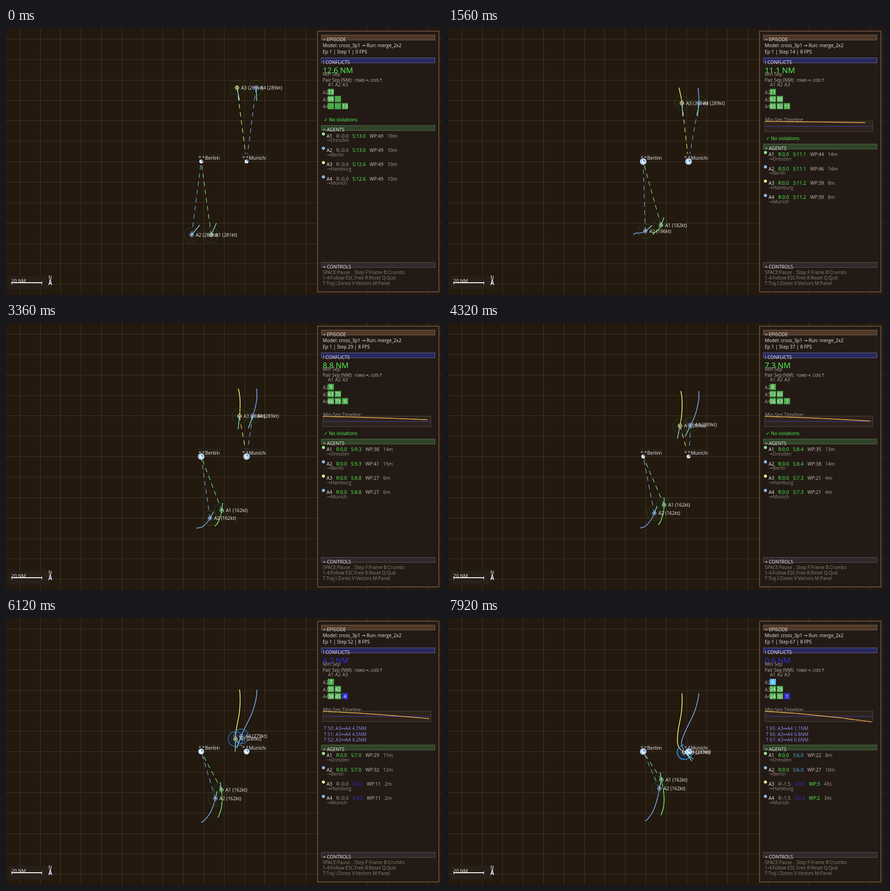
These frames come from a looping animation (956x586 px, 8 s). An HTML page:

```html
<!DOCTYPE html>
<html lang="en">
<head>
<meta charset="utf-8">
<title>Separation monitor</title>
<style>
html, body { margin: 0; width: 100%; height: 100%; overflow: hidden; background: #23190f; }
svg { display: block; width: 956px; height: 586px; font-family: "Open Sans", "Noto Sans", "DejaVu Sans", sans-serif; }
</style>
</head>
<body>
<svg viewBox="0 0 956 586"><g id="back"></g><g id="map"></g><g id="panel"></g></svg>
<script>
const LOOP = 8000, STEP = 120, NM = 3.32; // NM: pixels per nautical mile
const GREEN = '#50ff50', SKY = '#50beff', BLUE = '#3232dc', WHITE = '#ebebeb', GRAY = '#aaa299', DIM = '#8c847b', BOX = '#281f18';
const BERLIN = [428, 293], MUNICH = [527.5, 293];

// Steps at which the southern and northern pairs pass their waypoints.
const SOUTH = [1, 3, 8, 14, 29, 48, 67], NORTH = [1, 14, 29, 48, 58, 67, 72];
const slowTo = (floor, from, rate) => s => Math.max(floor, from - rate * (s - 1));
const slowAfter = (start, rate) => s => 289 - rate * Math.max(0, s - start);

const agents = [
  { name: 'A1', dest: 'Dresden', goal: BERLIN, color: '#78ff78', times: SOUTH, kt: slowTo(162, 281, 7.6),
    path: [[450, 454], [452, 449.8], [461, 443], [467, 433], [473, 411.5], [473, 383], [468, 355]] },
  { name: 'A2', dest: 'Berlin', goal: BERLIN, color: '#78b4ff', times: SOUTH, kt: slowTo(162, 282, 6.6),
    path: [[407, 454], [410, 450.7], [421.5, 449.8], [432.5, 446], [447.2, 428.3], [457.5, 402], [463.5, 374.5]] },
  { name: 'A3', dest: 'Hamburg', goal: MUNICH, color: '#ffff78', times: NORTH, kt: slowAfter(48, 2.2),
    path: [[506.6, 131], [512.9, 165], [512, 204.5], [503.7, 254.6], [504.8, 280.6], [518, 295], [531, 301]] },
  { name: 'A4', dest: 'Munich', goal: MUNICH, color: '#78b4ff', times: NORTH, kt: slowAfter(46, 1.6),
    path: [[548.4, 131], [550, 165], [541.1, 204], [520, 249.6], [512, 274.8], [519.5, 293.7], [531, 302]] }
];

// Cubic Hermite through unevenly timed waypoints.
function place({ path, times }, s) {
  const last = path.length - 1;
  let i = 0;
  while (i < last - 1 && s > times[i + 1]) i++;
  const h = times[i + 1] - times[i], u = (s - times[i]) / h;
  const slope = (k, c) => {
    const p = Math.max(0, k - 1), n = Math.min(last, k + 1);
    return (path[n][c] - path[p][c]) / (times[n] - times[p]);
  };
  return [0, 1].map(c =>
    path[i][c] * (1 + 2 * u) * (1 - u) ** 2 + slope(i, c) * h * u * (1 - u) ** 2 +
    path[i + 1][c] * u * u * (3 - 2 * u) + slope(i + 1, c) * h * u * u * (u - 1));
}
function heading(agent, s) {
  const p = place(agent, s), q = place(agent, s + 0.2);
  return Math.atan2(q[0] - p[0], p[1] - q[1]);
}
const miles = (p, q) => Math.hypot(p[0] - q[0], p[1] - q[1]) / NM;
const separation = (i, j, s) => miles(place(agents[i], s), place(agents[j], s));
const nearest = (i, s) => i < 2 ? separation(0, 1, s) : separation(2, 3, s);
const minSep = s => Math.min(nearest(0, s), nearest(2, s));
const level = (d, ok, near, bad) => d < 5 ? bad : d < 7 ? near : ok;

const text = (x, mid, str, fill = WHITE, size = 10.3, extra = '') =>
  `<text x="${x}" y="${mid + size * 0.36}" fill="${fill}" font-size="${size}" ${extra}>${str}</text>`;
const rect = (x, y, w, h, fill, stroke = 'none') =>
  `<rect x="${x}" y="${y}" width="${w}" height="${h}" fill="${fill}" stroke="${stroke}"/>`;
const line = (x1, y1, x2, y2, stroke, width = 1, extra = '') =>
  `<line x1="${x1}" y1="${y1}" x2="${x2}" y2="${y2}" stroke="${stroke}" stroke-width="${width}" ${extra}/>`;
const circle = (x, y, r, fill, stroke = 'none', width = 1) =>
  `<circle cx="${x}" cy="${y}" r="${r}" fill="${fill}" stroke="${stroke}" stroke-width="${width}"/>`;
const poly = (pts, stroke, width) =>
  `<polyline points="${pts.map(p => p.map(v => v.toFixed(2)).join()).join(' ')}" fill="none" stroke="${stroke}" stroke-width="${width}"/>`;
const header = (y, str, fill, stroke) =>
  rect(691.5, y + 0.5, 249, 11, fill, stroke) + text(695, y + 10, str);

function drawBack() {
  let out = rect(0, 0, 956, 586, '#23190f');
  for (let i = 0; i < 22; i++) {
    const x = Math.round(29.8 + i * 44.8) + 0.5, y = Math.round(24 + i * 44.85) + 0.5;
    out += line(x, 0, x, 586, '#40352a') + line(0, y, 956, y, '#40352a');
  }
  out += rect(6, 544, 90, 30, BOX) + text(12, 555, '20 NM');
  out += line(12, 559, 79, 559, '#fff', 2) + line(12.5, 556, 12.5, 563, '#fff') + line(78.5, 556, 78.5, 563, '#fff');
  out += text(93, 547.5, 'N');
  return out + '<path d="M97 551L100 563L97 560L94 563Z" fill="#5a6ec8" stroke="#fff" stroke-width="1.2"/>';
}

function drawAgent(agent, i, s) {
  const [x, y] = place(agent, s), turn = heading(agent, s), kt = agent.kt(s);
  const close = nearest(i, s) < 5;
  const trail = [];
  for (let k = s <= 20 ? 1 : Math.round(0.2 * s + 0.3); k <= s; k++) trail.push(place(agent, k));
  return line(x, y, ...agent.goal, agent.color, 1.2, 'stroke-dasharray="10 8"') +
    poly(trail, agent.color, 1.6) +
    circle(x, y, 16, 'none', close ? '#2882c8' : '#24501c', close ? 1.4 : 1) +
    circle(x, y, 9, 'none', close ? '#2c3cae' : '#343029') +
    circle(x, y, 4, '#30302c', agent.color, 1.3) +
    line(x - 3, y, x + 3, y, '#fff') + line(x, y - 3, x, y + 3, '#fff') +
    line(x, y, x + Math.sin(turn) * kt * 0.1, y - Math.cos(turn) * kt * 0.1, '#96ffff', 1.3) +
    text(x + 9, y, `${agent.name} (${Math.round(kt)}kt)`);
}

function drawCity([x, y], left, width, name, ghost, s) {
  const pulse = -Math.sin(s * 0.36);
  return rect(left, 276, width, 14.5, BOX) + text(left + width - 7, 285.5, ghost, '#b4aea6') +
    text(left + 1.5, 285, '* *', WHITE, 9.5) + text(left + 15.5, 285, name) +
    (pulse > 0 ? circle(x, y, 5.5 + pulse, '#64aaff', '#fff', 1.3) : '') +
    circle(x, y, 4.2, '#f0f4fa') +
    `<path d="M${x} ${y}v-3.5a3.5 3.5 0 0 1 3.5 3.5z" fill="#4a86c4"/>`;
}

function drawMap(s) {
  return agents.map((a, i) => drawAgent(a, i, s)).join('') +
    drawCity(BERLIN, 421, 49, 'Berlin', 'n', s) +
    drawCity(MUNICH, 517, 57, 'Munich', 'ı', s);
}

function drawMatrix(s) {
  let out = '';
  for (let j = 0; j < 3; j++) out += text(706 + j * 15.7, 124, 'A' + (j + 1), GRAY);
  for (let i = 1; i < 4; i++) {
    const y = 133.5 + (i - 1) * 15.6;
    out += text(694.5, y + 8, 'A' + (i + 1), GRAY);
    for (let j = 0; j < i; j++) {
      const d = separation(i, j, s), x = 705.5 + j * 15.5;
      out += rect(x, y, 13.5, 13.5, level(d, '#4aaa4a', '#5abeff', '#3030c8'));
      if (d < 99.5) out += text(x + 6.75, y + 7, Math.round(d), '#fff', 10.6, 'text-anchor="middle"');
    }
  }
  return out;
}

function drawTimeline(s) {
  const pts = [];
  for (let i = 0; i < s; i++) pts.push([695 + 237 * i / s, 229.1 - 1.917 * minSep(i + 1)]);
  return text(695, 201, 'Min-Sep Timeline:', GRAY) + rect(694.5, 204.5, 237, 23, '#2d231b', '#52463a') +
    line(695, 216, 932, 216, '#4640be') + poly(pts, '#ffbe5a', 1.4);
}

function drawRow(agent, i, s, y) {
  const sep = nearest(i, s), reward = 0.078 * Math.max(0, 5 - sep) ** 2;
  const left = miles(place(agent, s), agent.goal), wp = Math.round(left), eta = left / agent.kt(s) * 60;
  const minus = s === 1 || reward > 0.005;
  const cell = (str, fill) => `<tspan dx="8.7" fill="${fill}">${str}</tspan>`;
  const cells = agent.name +
    cell('R:' + (minus ? '-' : '') + reward.toFixed(1), minus ? GRAY : GREEN) +
    cell('S:' + sep.toFixed(1), level(sep, GREEN, SKY, BLUE)) +
    cell('WP:' + wp, wp < 10 ? GREEN : '#c8c0b8') +
    cell(eta < 1 ? Math.round(eta * 60) + 's' : Math.round(eta) + 'm', GRAY);
  return circle(696, y - 4.2, 3, agent.color, '#fff', 0.6) + text(703, y, cells) +
    text(703.5, y + 9.6, '→' + agent.dest, DIM);
}

function drawPanel(s) {
  const min = minSep(s), alerts = [];
  for (let k = 1; k <= s; k++) {
    const d = nearest(2, k);
    if (d < 5) alerts.push(`T ${k}: A3↔A4 ${d.toFixed(1)}NM`);
  }
  const recent = alerts.slice(-3);
  const shift = s > 1 ? 40.7 : 0, top = 213.5 + shift + 12 * Math.max(0, recent.length - 1);
  let out = '<rect x="683.25" y="7" width="266" height="572.3" fill="#241a16" fill-opacity=".97" stroke="#80654f" stroke-width="1.4"/>';
  out += header(15, '= EPISODE', '#4f3828', '#78604a');
  out += text(694.5, 38, 'Model: cross_3p1 → Run: merge_2x2', WHITE, 10.2);
  out += text(694.5, 52, `Ep 1 | Step ${s} | ${s > 1 ? 8 : 0} FPS`, WHITE, 10.2);
  out += header(65, '! CONFLICTS', '#282860', '#66628a');
  out += text(694.5, 93, min.toFixed(1) + ' NM', min < 5 ? BLUE : GREEN, 17);
  out += text(694.5, 101, 'Min Sep', GRAY);
  out += text(694.5, 114.5, 'Pair Sep (NM):\u00a0 rows→, cols↑', '#b9b1a8', 9.9);
  out += drawMatrix(s);
  if (s > 1) out += drawTimeline(s);
  if (recent.length) recent.forEach((str, i) => out += text(697, 242 + i * 12.8, str, '#8c8cf0'));
  else out += text(697, 201.3 + shift, '✓', GREEN) + text(708, 201.3 + shift, 'No violations', GREEN);
  out += header(top, '&gt; AGENTS', '#2f4428', '#5a6e4a');
  agents.forEach((a, i) => out += drawRow(a, i, s, top + 23.3 + i * 31.4));
  out += header(514, '+ CONTROLS', '#32282a', '#605252');
  ['SPACE:Pause . :Step F:Frame B:Crumbs', '1-4:Follow ESC:Free R:Reset Q:Quit', 'T:Traj I:Zones V:Vectors M:Panel']
    .forEach((str, i) => out += text(694.5, 536 + i * 12, str, DIM, 10));
  return out;
}

const [back, map, panel] = ['back', 'map', 'panel'].map(id => document.getElementById(id));
const start = performance.now();
let shown = 0;
back.innerHTML = drawBack();

function tick() {
  const s = 1 + Math.floor(((performance.now() - start) % LOOP) / STEP);
  if (s !== shown) {
    shown = s;
    map.innerHTML = drawMap(s);
    panel.innerHTML = drawPanel(s);
  }
  requestAnimationFrame(tick);
}
tick();
</script>
</body>
</html>
```
